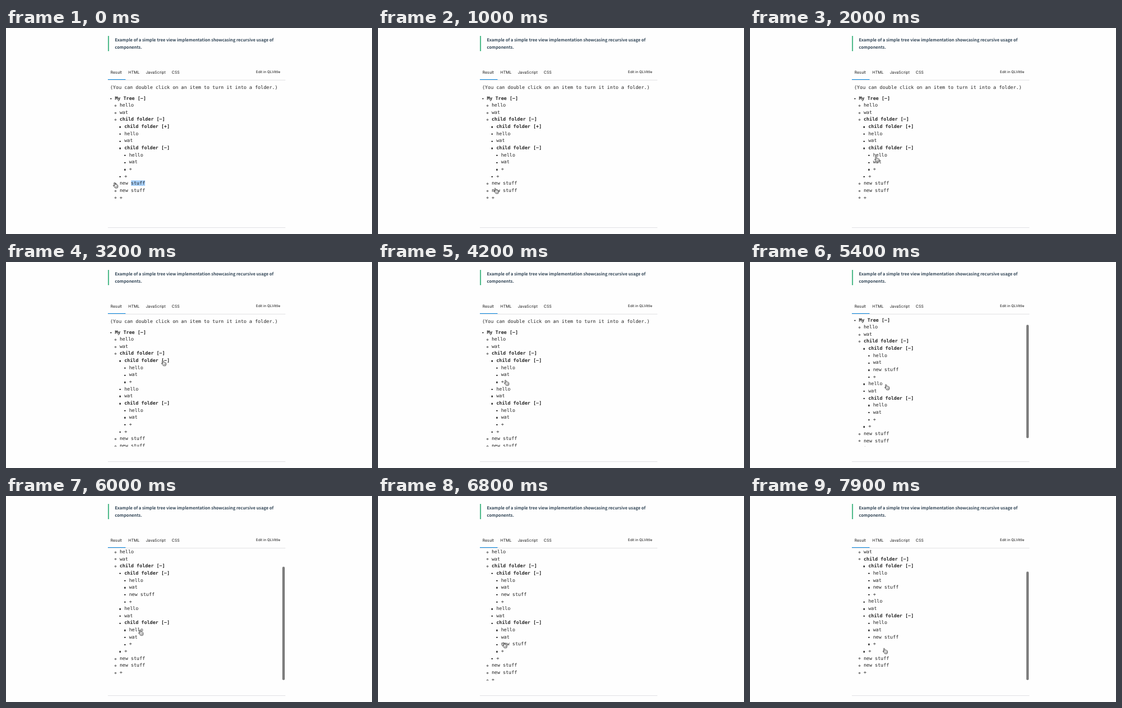
An HTML page for the animation above (8000 ms loop, 600 px wide and 338 px high).

```html
<!DOCTYPE html>
<html lang="en">
<head>
<meta charset="utf-8">
<title>Tree view</title>
<style>
  :root { --row: 11.65px; --em: 7.74px; --loop: 8s step-end infinite; }
  html, body { margin: 0; width: 100%; height: 100%; overflow: hidden; background: #fefefe; }
  body { position: relative; text-rendering: geometricPrecision; }
  .abs, .tabs span, .pane, .note, .tree, .thumb, .hand { position: absolute; white-space: nowrap; }

  .quote {
    left: 167px; top: 13px; height: 24.5px; padding-left: 9.6px; border-left: 2px solid #5abf92;
    font: 600 6.88px/12px "Noto Sans CJK JP", "Noto Sans CJK SC", "Open Sans", sans-serif; color: #304455;
  }
  .tabs span { top: 66.7px; font: 6.45px/12px Inter, Roboto, sans-serif; color: #1a1a1a; }
  .tabs .edit { font-size: 5.84px; }
  .rule { left: 167px; width: 290.5px; height: 1px; background: #e4e4e6; }
  .active { left: 167px; top: 83.6px; width: 28.5px; height: 1.8px; background: #1b8fe0; }

  .pane {
    left: 167px; top: 86px; width: 291px; height: 217.3px; overflow: hidden;
    font: var(--em)/var(--row) "DejaVu Sans Mono", monospace; color: #252525;
  }
  .scroll { position: relative; animation: scroll var(--loop); }
  .note { left: 3.7px; top: 5.6px; }
  .tree { left: 3.7px; top: 23.5px; }

  ul { margin: 0; padding: 0 0 0 var(--em); list-style: none; }
  li { position: relative; min-height: 0; }
  li::before {
    content: ""; position: absolute; left: -7.9px; top: 5px;
    width: 2.5px; height: 2.5px; background: currentColor; border-radius: 50%;
  }
  li li::before { box-sizing: border-box; left: -8.1px; top: 4.8px; width: 3px; height: 3px; background: none; border: .65px solid; }
  li li li::before { left: -7.8px; top: 5.1px; width: 2.4px; height: 2.4px; background: currentColor; border: 0; border-radius: .5px; }

  .open { animation: open var(--loop); }
  .add1 { animation: add1 var(--loop); }
  .add2 { animation: add2 var(--loop); }
  .sign { position: relative; }
  .plus { position: absolute; left: 0; top: 0; line-height: 9px; animation: shut var(--loop); }
  .picked { animation: picked var(--loop); }

  .thumb { left: 286px; width: 3.6px; border-radius: 1.8px; background: #7e7e7e; animation: thumb var(--loop); }
  .hand { left: 0; top: 0; width: 9px; height: 10px; animation: hand 8s linear infinite; }

  @keyframes open {
    0% { height: 0; visibility: hidden; }
    40%, 100% { height: var(--row); visibility: visible; }
  }
  @keyframes add1 {
    0% { height: 0; visibility: hidden; }
    57.5%, 100% { height: var(--row); visibility: visible; }
  }
  @keyframes add2 {
    0% { height: 0; visibility: hidden; }
    85%, 100% { height: var(--row); visibility: visible; }
  }
  @keyframes shut {
    0% { visibility: visible; }
    40%, 100% { visibility: hidden; }
  }
  @keyframes picked {
    0% { background: #a8d1fb; }
    1.25%, 100% { background: transparent; }
  }
  @keyframes scroll {
    0% { top: 0; }
    67.5% { top: -20px; }
    68.75% { top: -35.2px; }
    92.5% { top: -41px; }
    93.75%, 100% { top: -46.9px; }
  }
  @keyframes thumb {
    0% { top: 1px; height: 186px; opacity: 0; }
    67.5% { top: 17px; opacity: 1; }
    68.75% { top: 30.2px; }
    76.25% { opacity: .6; }
    77.5% { opacity: .25; }
    78.75% { opacity: 0; }
    92.5% { top: 35px; height: 178px; opacity: 1; }
    93.75%, 100% { top: 38.3px; height: 178px; opacity: 1; }
  }
  /* The pointer advances in 100 ms hops. */
  @keyframes hand {
    0% { transform: translate(175px, 253px); }
    6.25% { transform: translate(175px, 253px); animation-timing-function: steps(4, start); }
    11.25% { transform: translate(184px, 277px); animation-timing-function: steps(5, start); }
    17.5% { transform: translate(197px, 240px); animation-timing-function: steps(7, start); }
    26.25% { transform: translate(203.5px, 210.3px); }
    28.75% { transform: translate(203.5px, 210.3px); animation-timing-function: steps(4, start); }
    33.75% { transform: translate(250.3px, 160.3px); }
    36.25% { transform: translate(250.3px, 160.3px); animation-timing-function: steps(2, start); }
    38.75% { transform: translate(254px, 160.7px); }
    43.75% { transform: translate(254px, 160.7px); animation-timing-function: steps(9, start); }
    55% { transform: translate(200.2px, 197.2px); animation-timing-function: steps(1, start); }
    56.25% { transform: translate(200.2px, 199px); }
    62.5% { transform: translate(200.2px, 199px); animation-timing-function: steps(2, start); }
    65% { transform: translate(220px, 200.3px); }
    73.75% { transform: translate(220px, 200.3px); animation-timing-function: steps(2, start); }
    76.25% { transform: translate(216.5px, 219.3px); animation-timing-function: steps(6, start); }
    83.75% { transform: translate(203px, 239.7px); }
    88.75% { transform: translate(203px, 239.7px); animation-timing-function: steps(2, start); }
    91.25% { transform: translate(226.5px, 241px); }
    98.75% { transform: translate(226.5px, 241px); animation-timing-function: steps(1, start); }
    100% { transform: translate(217px, 249.3px); }
  }
</style>
</head>
<body>
  <div class="abs quote">Example of a simple tree view implementation showcasing recursive usage of<br>components.</div>

  <div class="tabs">
    <span style="left:171.2px">Result</span>
    <span style="left:200.6px">HTML</span>
    <span style="left:229.2px">JavaScript</span>
    <span style="left:271.7px">CSS</span>
    <span class="edit" style="left:409.8px">Edit in QLVittle</span>
  </div>
  <div class="abs rule" style="top:85px"></div>
  <div class="abs active"></div>

  <div class="pane">
    <div class="scroll">
      <div class="note">(You can double click on an item to turn it into a folder.)</div>
      <ul class="tree">
        <li><b>My Tree [−]</b>
          <ul>
            <li>hello</li>
            <li>wat</li>
            <li><b>child folder [−]</b>
              <ul>
                <li><b>child folder [<span class="sign"><span class="plus">+</span><span class="open">−</span></span>]</b>
                  <ul>
                    <li class="open">hello</li>
                    <li class="open">wat</li>
                    <li class="add1">new stuff</li>
                    <li class="open">+</li>
                  </ul>
                </li>
                <li>hello</li>
                <li>wat</li>
                <li><b>child folder [−]</b>
                  <ul>
                    <li>hello</li>
                    <li>wat</li>
                    <li class="add2">new stuff</li>
                    <li>+</li>
                  </ul>
                </li>
                <li>+</li>
              </ul>
            </li>
            <li>new <span class="picked">stuff</span></li>
            <li>new stuff</li>
            <li>+</li>
          </ul>
        </li>
      </ul>
    </div>
    <div class="thumb"></div>
  </div>
  <div class="abs rule" style="top:326.5px"></div>

  <svg class="hand" viewBox="0 0 18 20">
    <path d="M6 12 4 4.5Q3.6 2 5.2 1.6 6.7 1.3 7.4 3.4L9 8Q10 6.6 11.4 7.9 12.8 7 13.8 8.6 15.6 8 16.2 10L16.6 14Q16.6 16 15.4 18.6L8.2 18.8Q6.6 15.6 3 13 1 11 2.4 10.2 3.8 9.6 6 12Z" fill="#fff" stroke="#111" stroke-width="1.6" stroke-linejoin="round"/>
    <path d="M9.4 12.4v3.4M11.6 12.2v3.6M13.8 12v3.6" stroke="#333" fill="none"/>
  </svg>
</body>
</html>
```
